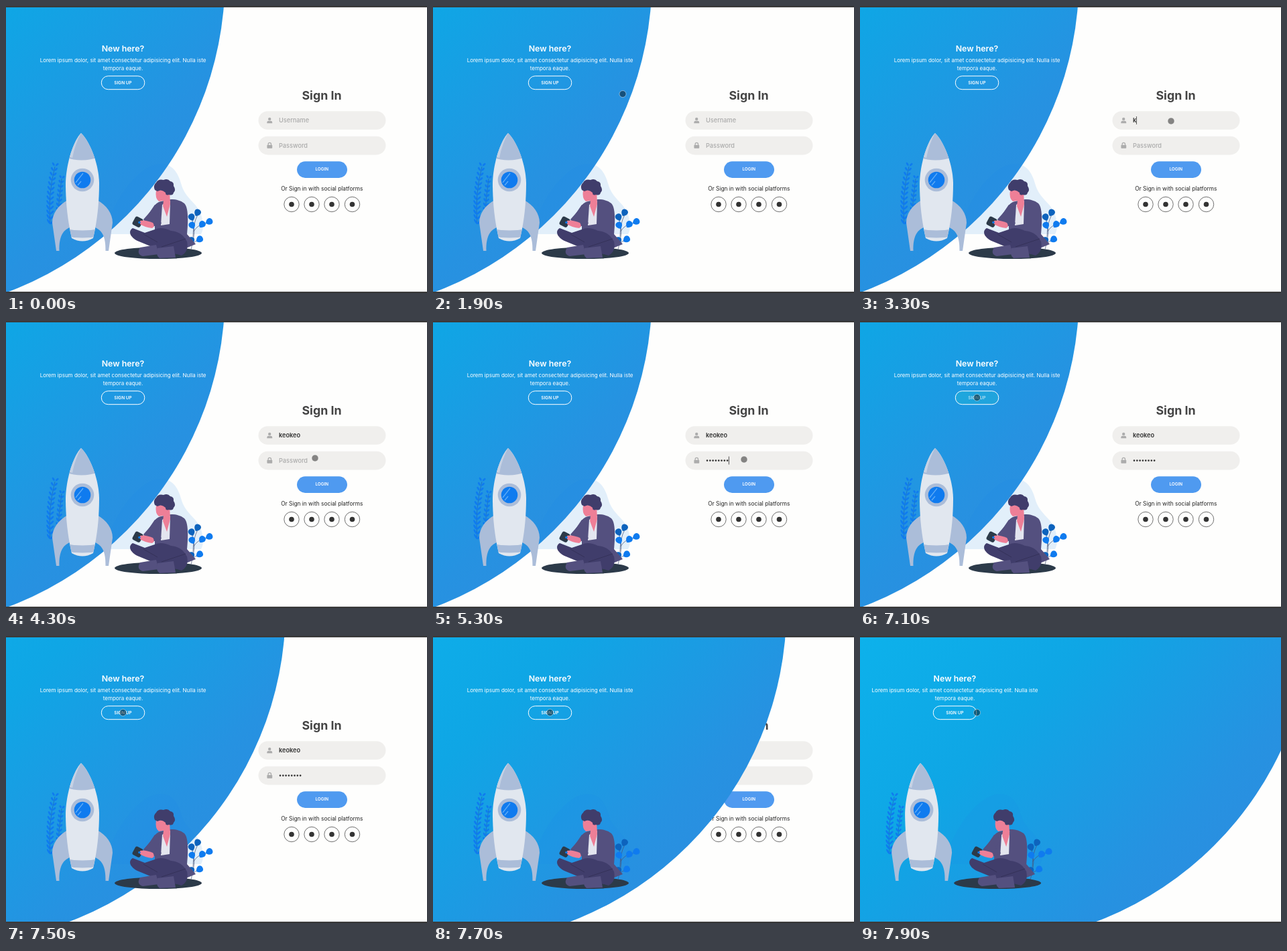
These frames come from a looping animation (628x429 px, 8000 ms). An HTML page:

```html
<!DOCTYPE html>
<html lang="en">
<head>
<meta charset="utf-8">
<title>Sign in</title>
<style>
html, body { margin: 0; height: 100%; overflow: hidden; background: #fefefd; }
svg { display: block; width: 100vw; height: 100vh; font-family: Inter, "Open Sans", sans-serif; }
.mid { text-anchor: middle; }
.semi { font-weight: 600; }
.field { font-size: 9.2px; font-weight: 500; fill: #aaa; }
.field.typed { font-weight: 600; fill: #333; }
.steel { fill: #abbdd9; }
.pale { fill: #e1e7ef; }
.jacket { fill: #54507f; }
.navy { fill: #403d6b; }
.skin { fill: #ee7f97; }
.ink { fill: #2c3a49; }
.bright { fill: #0f7bef; }
.deep { fill: #0d63bd; }
</style>
</head>
<body>
<svg viewBox="0 0 628 429" preserveAspectRatio="none">
  <defs>
    <linearGradient id="sky" x1="0" y1="0" x2="1" y2="1">
      <stop offset=".38" stop-color="#0cb5ed"/>
      <stop offset=".61" stop-color="#0fa6e5"/>
      <stop offset=".81" stop-color="#2692e1"/>
      <stop offset="1" stop-color="#3387de"/>
    </linearGradient>
    <path id="hull" d="M112 190C102 200 90 232 89 264C89 300 93 325 98 347Q114 356 130 347C135 325 139 300 139 264C138 232 123 200 112 190Z"/>
    <clipPath id="inHull"><use href="#hull"/></clipPath>
    <path id="drop" d="M0 0C-7-4-6-11 0-11S7-4 0 0Z"/>
  </defs>

  <g id="form">
    <text class="mid" x="471" y="140" font-size="17.8" font-weight="700" fill="#444">Sign In</text>
    <g fill="#f0efed">
      <rect x="376.5" y="157.2" width="190" height="27.6" rx="13.8"/>
      <rect x="376.5" y="194.8" width="190" height="27.6" rx="13.8"/>
    </g>
    <g fill="#acacac">
      <circle cx="393.2" cy="168.9" r="2.2"/>
      <path d="M389.3 175.2V174Q389.3 171.8 391.5 171.8H395Q397.2 171.8 397.2 174V175.2Z"/>
      <rect x="389.4" y="207.8" width="7.8" height="5" rx=".8"/>
      <path d="M391.1 208V206.5A2.2 2.2 0 0 1 395.5 206.5V208" fill="none" stroke="#acacac" stroke-width="1.2"/>
    </g>
    <text id="user" class="field" x="407" y="174.2"></text>
    <text id="pass" class="field" x="407" y="211.7">Password</text>
    <g id="dots" fill="#333"></g>
    <rect id="caret" width=".9" height="12" fill="#444"/>
    <rect x="434" y="232.3" width="75" height="24.6" rx="12.3" fill="#4f9af0"/>
    <text class="mid semi" x="471.2" y="246.4" font-size="6.3" fill="#fff">LOGIN</text>
    <text class="mid" x="471.3" y="276.3" font-size="8.36" fill="#222">Or Sign in with social platforms</text>
    <g id="social" stroke="#333" stroke-width=".7"></g>
  </g>

  <circle id="disc" cy="-40.5" r="500" fill="url(#sky)"/>

  <g id="art">
    <path d="M150 341C150 310 190 240 228 236C248 235 256 248 261 265C268 290 284 292 291 312Q297 330 291 341Z" fill="#1a85e0" opacity=".12"/>
    <g id="ferns" class="bright"></g>
    <g class="steel">
      <path d="M92 290C78 298 69 310 69 324Q72 345 75 366H79.500C79 344 85 334 98 330Z"/>
      <path d="M136 290C150 298 159 310 159 324Q156 345 153 366H148.500C149 344 143 334 130 330Z"/>
    </g>
    <use href="#hull" class="pale"/>
    <g clip-path="url(#inHull)">
      <path class="steel" d="M85 185H140V225Q113 236 85 225Z"/>
      <path class="pale" d="M112 190Q103 206 99 227L94 225Q98 204 110 188Z" opacity=".5"/>
      <path class="steel" d="M85 332Q114 339 143 332V343Q114 350 85 343Z"/>
    </g>
    <circle class="steel" cx="114" cy="260" r="17.3"/>
    <circle class="bright" cx="114" cy="260" r="12.3"/>
    <path d="M104 264L115 250M107 268L112 262" stroke="#5fabf5" stroke-width="1.4"/>

    <ellipse class="ink" cx="227" cy="369.300" rx="65" ry="8.8"/>
    <path d="M276 364Q285 335 277 318M279 345Q279 325 286 312M280 337Q285 327 300 324M278 357Q280 352 288 349" fill="none" stroke="#47557a" stroke-width=".7"/>
    <g id="leaves"></g>
    <path class="jacket" d="M238 291C226 292 222 296 220 302L205 319L213 331L222 325V342L264 350L266 363L283 356L270 341C272 320 272 301 266 295Q256 288 246 289Z"/>
    <path d="M233 297L245 291L244 326L231 328Z" fill="#e3e5ef"/>
    <path class="skin" d="M224 275Q222 288 228 292L235 291L234 299L240 315L245 296L244 276Z"/>
    <path class="navy" d="M222 275Q219 268 224 264Q227 258 235 260Q241 257 245 262Q251 263 250 269Q254 275 250 279Q249 284 243 282Q238 284 238 279Q232 273 226 277Z"/>
    <path class="navy" d="M189 332C181 337 186 346 196 351L225 363L262 373Q273 367 270 352Q262 337 246 336Q232 329 222 334L207 339Z"/>
    <path d="M268 348L232 360M205 341L226 353" stroke="#353259" fill="none"/>
    <path class="jacket" d="M200 361L224 357L228 371L204 374Q194 371 200 361Z"/>
    <path class="jacket" d="M226 362L250 359L253 376L229 377Q222 371 226 362Z"/>
    <path class="jacket" d="M222 297L207 319L219 330L232 325L229 319L223 317L232 304Z"/>
    <rect class="ink" x="190" y="316" width="13" height="14" rx="3" transform="rotate(28 197 323)"/>
    <path class="skin" d="M200 321Q207 319 219 324Q223 329 218 332Q207 331 200 326Z"/>
    <circle class="bright" cx="199" cy="323.500" r="1.8"/>
  </g>

  <g id="intro" fill="#fff">
    <text class="mid semi" x="174.5" y="68.4" font-size="12.4">New here?</text>
    <g class="mid" font-size="8.02">
      <text x="174.500" y="84.3">Lorem ipsum dolor, sit amet consectetur adipisicing elit. Nulla iste</text>
      <text x="174.500" y="95.600">tempora eaque.</text>
    </g>
    <rect id="button" x="142.300" y="104.700" width="64.500" height="20" rx="10" fill="#2cc" stroke="#fff"/>
    <text id="label" class="mid semi" x="174.500" y="117.100" font-size="6.5">SIGN UP</text>
  </g>

  <g fill="#3b3b3b">
    <rect width="628" height="2"/>
    <rect y="427" width="628" height="2"/>
  </g>
  <circle id="pointer" r="5" fill="#000" fill-opacity=".45" stroke="#fff" stroke-opacity=".55" stroke-width=".8"/>
</svg>
<script>
const $ = id => document.getElementById(id);
const set = (el, attrs) => { for (const k in attrs) el.setAttribute(k, attrs[k]); return el; };
const add = (parent, tag, attrs) =>
  parent.appendChild(set(document.createElementNS("http://www.w3.org/2000/svg", tag), attrs));

const LOOP = 8000, STEP = 100, SWEEP = 7081, SLIDE = 7719;
const NAME = "keokeo";
const nameTimes = [3300, 3400, 3500, 3700, 3700, 3900];
const pointerPath = [
  [300, 85, 33], [500, 98, 41], [700, 106, 47], [900, 200, 112], [1000, 161, 110],
  [1100, 161, 110], [1200, 168, 114], [1300, 175, 120], [1400, 166, 119], [1800, 166, 119],
  [1900, 283, 131.5], [2000, 397.5, 159], [2100, 398, 160], [2200, 440, 168], [2300, 464, 172],
  [3600, 464, 172], [3700, 464, 191], [3800, 464, 191], [4300, 461, 205], [4500, 461, 205],
  [4700, 464, 207], [5300, 464, 207], [5400, 466, 208], [5500, 468, 207], [5700, 468, 207],
  [6600, 179, 110], [6700, 174.5, 114.5], [LOOP, 174.5, 114.5]
];

for (const x of [426, 456, 486, 516.5]) {
  add($("social"), "circle", { cx: x, cy: 296.5, r: 11.2, fill: "none" });
  add($("social"), "circle", { cx: x, cy: 296.5, r: 3.8, fill: "#333", stroke: "none" });
}
for (let i = 0; i < 8; i++) add($("dots"), "circle", { cx: 409 + i * 4.3, cy: 208.6, r: 1.3 });

// Leaf pairs along a bent stem, shrinking towards the tip
function fern(x0, y0, bend, x1, y1, pairs, size) {
  add($("ferns"), "path", { d: `M${x0} ${y0}Q${bend} ${(y0 + y1) / 2} ${x1} ${y1}`, fill: "none", stroke: "#1868c4", "stroke-width": .8 });
  for (let i = 0; i <= pairs; i++) {
    const u = i / pairs, v = 1 - u;
    const x = v * v * x0 + 2 * u * v * bend + u * u * x1, y = y0 + (y1 - y0) * u;
    for (const side of [-1, 1])
      add($("ferns"), "ellipse", {
        cx: size, rx: size * (1 - u * .35), ry: 1.4,
        transform: `translate(${x} ${y}) rotate(${-82 + side * 40})`
      });
  }
}
fern(66, 326, 62, 73, 240, 12, 4.4);
fern(78, 320, 78, 83, 258, 9, 3.4);

const leaves = [
  [279, 321, -22, "deep"], [283, 314, 28, "deep"], [298, 325, 62, "bright"], [289, 331, 38, "bright"],
  [280, 333, -25, "bright"], [284, 352, 55, "bright"], [278, 356, -15, "deep"]
];
for (const [x, y, turn, tone] of leaves)
  add($("leaves"), "use", { href: "#drop", class: tone, transform: `translate(${x} ${y}) rotate(${turn})` });

// cubic-bezier(.42, 0, .58, 1)
function easeInOut(x) {
  if (x <= 0 || x >= 1) return x <= 0 ? 0 : 1;
  let lo = 0, hi = 1;
  for (let i = 0; i < 24; i++) {
    const u = (lo + hi) / 2, v = 1 - u;
    if (1.26 * u * v * v + 1.74 * u * u * v + u * u * u < x) lo = u; else hi = u;
  }
  return lo * lo * (3 - 2 * lo);
}

function pointerAt(t) {
  const i = Math.max(1, pointerPath.findIndex(p => p[0] >= t));
  const [t0, x0, y0] = pointerPath[i - 1], [t1, x1, y1] = pointerPath[i];
  const u = (t - t0) / (t1 - t0);
  return [x0 + (x1 - x0) * u, y0 + (y1 - y0) * u];
}

const within = (t, a, b) => t >= a && t < b;
const show = (el, on) => set(el, { visibility: on ? "visible" : "hidden" });

function draw(t) {
  const typed = nameTimes.filter(at => t >= at).length;
  const user = $("user");
  user.textContent = typed ? NAME.slice(0, typed) : "Username";
  user.classList.toggle("typed", typed > 0);

  const count = Math.max(0, Math.min(8, Math.floor((t - 4500) / 100)));
  show($("pass"), !count);
  [...$("dots").children].forEach((dot, i) => show(dot, i < count));

  show($("caret"), within(t, 2500, 3000) || within(t, 3300, 4300) ||
    within(t, 4600, 5800) || within(t, 6300, 6700));
  set($("caret"), count
    ? { x: 406.5 + count * 4.3, y: 202.5 }
    : { x: 406.7 + (typed ? user.getComputedTextLength() : 0), y: 165 });

  set($("disc"), { cx: -173.4 + 974.8 * easeInOut((t - SWEEP) / 1970) });
  const slide = (id, duration) =>
    set($(id), { transform: `translate(${-400 * easeInOut((t - SLIDE) / duration)} 0)` });
  slide("art", 1100);
  slide("intro", 900);

  const pressed = within(t, 7100, 7300);
  set($("button"), { "fill-opacity": pressed ? .25 : 0 });
  set($("label"), { opacity: pressed ? .65 : 1 });

  show($("pointer"), t >= 300);
  const [cx, cy] = pointerAt(Math.max(t, 300));
  set($("pointer"), { cx, cy });
}

const start = performance.now();
function tick() {
  const t = (performance.now() - start) % LOOP;
  draw(Math.floor(t / STEP) * STEP);
  requestAnimationFrame(tick);
}
tick();
</script>
</body>
</html>
```
